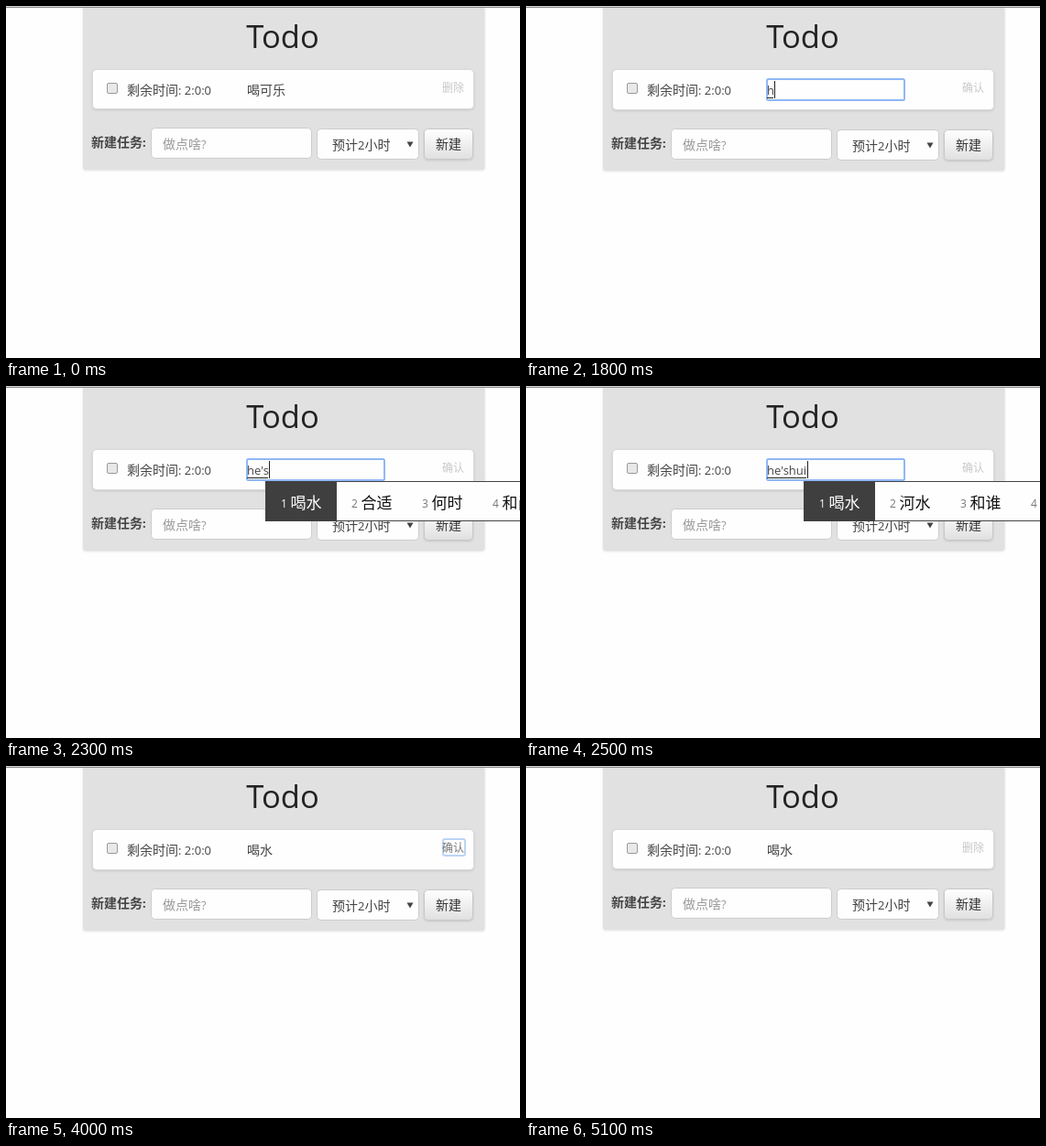
Write an HTML page that moves like this. It is 561 px wide and 385 px high and loops after 5.2 s.

```html
<!DOCTYPE html>
<html lang="zh-CN">
<head>
<meta charset="utf-8">
<title>Todo</title>
<style>
  html, body { margin: 0; width: 100%; height: 100%; overflow: hidden; background: #fefefe; }
  svg { display: block; width: 561px; height: 385px; }
  text { font: 14px "Open Sans", "Noto Sans CJK SC", "Noto Sans CJK", sans-serif; fill: #444; white-space: pre; }
  .latin { font-size: 13px; }
  .title { font-size: 34.5px; font-weight: 500; fill: #222; text-anchor: middle; }
  .label { font-weight: 700; }
  .hint { fill: #999; }
  .action { font-size: 12px; fill: #c8c8c8; }
  .action.focused { fill: #777; }
  .field { fill: #fefefe; stroke: #ccc; }
  .word { font-size: 17px; fill: #111; }
  .number { font-size: 12px; fill: #777; }
  .chosen { fill: #fff; }
  .soft { filter: drop-shadow(0 1px 1px rgba(0, 0, 0, .12)); }
</style>
</head>
<body>
<svg viewBox="0 0 561 385">
  <defs>
    <linearGradient id="shade" x2="0" y2="1">
      <stop stop-color="#fff"/><stop offset="1" stop-color="#e0e0e0"/>
    </linearGradient>
  </defs>
  <rect y="0" width="561" height="1" fill="#d8d8d8"/>
  <rect y="1" width="561" height="1" fill="#8c8c8c"/>
  <path id="card" class="soft" fill="#e1e1e1"/>
  <text class="title" x="302" y="46">Todo</text>

  <rect id="item" class="soft" x="94.5" y="69.5" width="416" rx="4" fill="#fefefe" stroke="#d9d9d9"/>
  <rect x="110.5" y="84.5" width="11" height="11" rx="1.5" fill="#e8e8e8" stroke="#9a9a9a"/>
  <text x="132" y="96.5">剩余时间<tspan class="latin">: 2:0:0</tspan></text>
  <rect id="editor" x="263" y="80" width="150" height="23" rx="1.5" fill="#fefefe" stroke-width="2"/>
  <text id="value" x="263" y="96.5"></text>
  <rect id="underline" x="263" y="100" height="1" fill="#222"/>
  <rect id="caret" y="82" width="1" height="19" fill="#222"/>
  <rect id="ring" x="477" y="80" width="24" height="18" rx="2" fill="#fefefe" stroke="#bcd4f7" stroke-width="2"/>
  <text id="action" class="action" x="476" y="94"></text>

  <g id="form">
    <text class="label" x="93" y="154">新建任务<tspan class="latin">:</tspan></text>
    <rect class="field" x="158.5" y="133.5" width="175" height="33" rx="4"/>
    <text class="hint" x="171" y="156">做点啥<tspan class="latin">?</tspan></text>
    <rect class="field" x="339.5" y="134.5" width="111" height="33" rx="4"/>
    <text x="356" y="157">预计<tspan class="latin">2</tspan>小时</text>
    <path d="M437.5 148.5h7l-3.500 6z" fill="#444"/>
    <rect class="soft" x="456.5" y="134.500" width="53" height="33" rx="4" fill="url(#shade)" stroke="#c8c8c8"/>
    <text x="469" y="156" style="fill:#333">新建</text>
  </g>
  <g id="popup"></g>
</svg>
<script>
const LOOP = 5200;
const $ = id => document.getElementById(id);

const view = (value, action, focused = false, tall = false) => ({ value, action, focused, tall });
const edit = (value, caret, words = "") => ({
  value, caret, words, action: "确认", tall: true, editing: true, typing: /[a-z]/.test(value)
});

const letterH = "和 好 会 还 很 后";
const syllableHe = "和 喝 何 合 河 核";
const pairs = "喝水 合适 何时 和尚 何事";
const steps = [
  [0, view("喝可乐", "删除")],
  [700, edit("", 263)],
  [1100, edit("", null)],
  [1600, edit("", 263)],
  [1800, edit("h", 271)],
  [1900, edit("h", 271, letterH)],
  [2000, edit("he", 278, syllableHe)],
  [2300, edit("he's", 287, pairs)],
  [2400, edit("he'sh", 295, pairs)],
  [2500, edit("he'shui", 307, "喝水 河水 和谁 合水")],
  [3000, edit("喝水", 291)],
  [3500, edit("喝水", null)],
  [3900, { ...edit("喝水", null), focused: true }],
  [4000, view("喝水", "确认", true, true)],
  [4100, view("喝水", "删除", true)],
  [5100, view("喝水", "删除")]
];

function popupMarkup(words, left) {
  if (!words) return "";
  const list = words.split(" ");
  const pitch = 43 + 17 * list[0].length;
  const cells = list.map((word, i) => {
    const x = left + 17 + pitch * i;
    const chosen = i ? "" : " chosen";
    return `<text class="number${chosen}" x="${x}" y="133">${i + 1}</text>` +
      `<text class="word${chosen}" x="${x + 10.5}" y="133.5">${word}</text>`;
  });
  return `<rect x="${left}" y="104" width="600" height="44" fill="#444"/>
    <rect x="${left + 1}" y="105" width="598" height="42" fill="#fefefe"/>
    <rect x="${left}" y="104" width="${pitch + 1}" height="44" fill="#3f3f3f"/>` + cells.join("");
}

function show(id, on) {
  $(id).setAttribute("visibility", on ? "visible" : "hidden");
}

function render(s) {
  const shift = s.tall ? 1 : 0;
  $("card").setAttribute("d", `M84 2H522.5V${176 + shift}q0 3-3 3H87q-3 0-3-3z`);
  $("item").setAttribute("height", 43 + shift);
  $("form").setAttribute("transform", `translate(0 ${shift})`);

  $("value").textContent = s.value;
  $("value").setAttribute("class", s.typing ? "latin" : "");
  $("editor").setAttribute("stroke", s.focused ? "#ddd" : "#8fb8f6");
  show("editor", s.editing);
  show("caret", s.caret);
  show("underline", s.typing);
  if (s.caret) {
    $("caret").setAttribute("x", s.caret);
    $("underline").setAttribute("width", Math.max(0, s.caret - 264));
  }

  $("action").textContent = s.action;
  $("action").classList.toggle("focused", s.focused === true);
  show("ring", s.focused);
  $("popup").innerHTML = popupMarkup(s.words, s.caret - 4);
}

let shown;
function tick() {
  const time = performance.now() % LOOP;
  const state = steps.findLast(([start]) => start <= time)[1];
  if (state !== shown) render(shown = state);
  requestAnimationFrame(tick);
}
tick();
</script>
</body>
</html>
```
